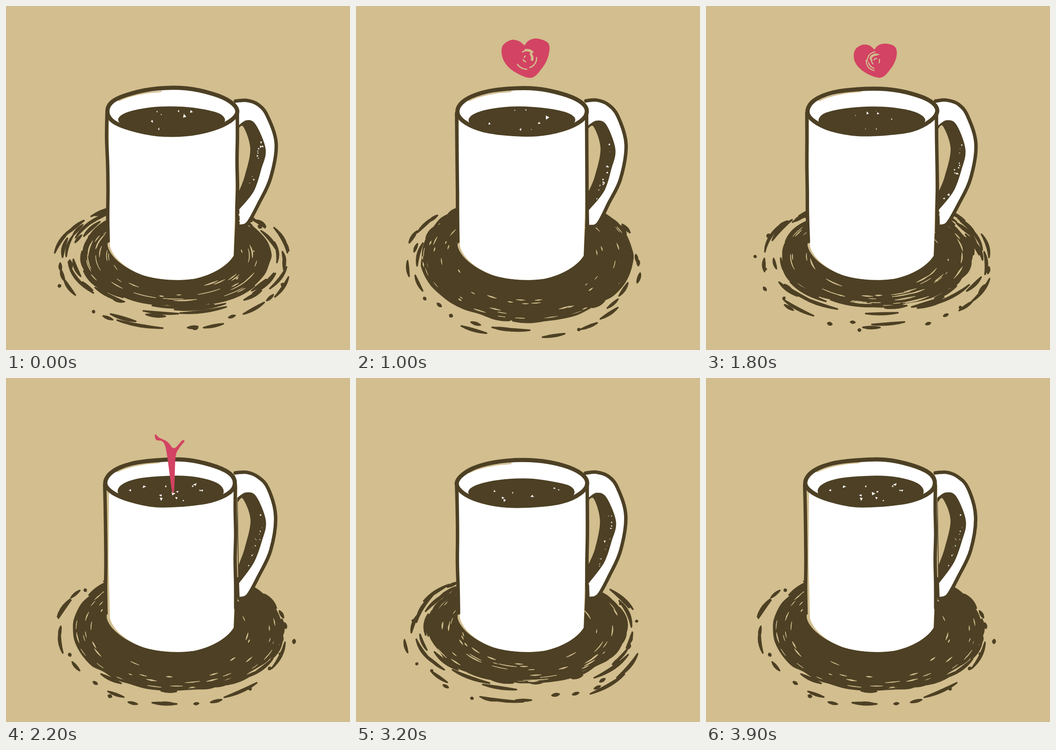
Write an HTML page that moves like this. It is 748 by 748 pixels and loops after 4 s.

```html
<!DOCTYPE html>
<html lang="en">
<head>
<meta charset="utf-8">
<title>Coffee cup</title>
<style>
html, body { margin: 0; width: 100%; height: 100%; overflow: hidden; background: #d2be8e; }
svg { display: block; width: 100vw; height: 100vh; }
path { stroke-linecap: round; stroke-linejoin: round; }
</style>
</head>
<body>
<svg id="stage" viewBox="0 0 748 748"></svg>
<script>
const TAN = '#d2be8e', INK = '#4d4024', PINK = '#d34363', WHITE = '#fff';
const STEP = 100, FRAMES = 40, POSES = 17, TAU = 2 * Math.PI;
const NS = 'http://www.w3.org/2000/svg';
const stage = document.getElementById('stage');

function layer(fill, stroke = 'none', width = 0, parent = stage) {
  const el = document.createElementNS(NS, 'path');
  el.setAttribute('fill', fill);
  el.setAttribute('stroke', stroke);
  el.setAttribute('stroke-width', width);
  parent.appendChild(el);
  return d => el.setAttribute('d', d);
}

const saucer = layer(INK, INK, 3.5);
const gaps = layer(TAN, TAN, 1);
const grip = layer(WHITE);
const gripShade = layer(INK, INK, 2);
const gripFlecks = layer(WHITE);
const hole = layer(TAN);
const shell = layer(TAN);
const body = layer(WHITE);
const mouth = layer(WHITE);
const lining = layer('none', TAN, 3);
const coffee = layer(INK, INK, 2);
const glints = layer(WHITE);
const thinLines = layer('none', INK, 7.5);
const thickLines = layer('none', INK, 9);
const love = document.createElementNS(NS, 'g');
stage.appendChild(love);
const heart = layer(PINK, PINK, 1.5, love);
const scribble = layer('none', TAN, 2.4, love);
const drops = layer(PINK, PINK, 3);

function seeded(seed) {
  let s = (seed * 2654435761 + 12345) >>> 0;
  return () => {
    s = (s + 0x6D2B79F5) >>> 0;
    let t = Math.imul(s ^ (s >>> 15), s | 1);
    t ^= t + Math.imul(t ^ (t >>> 7), t | 61);
    return ((t ^ (t >>> 14)) >>> 0) / 4294967296;
  };
}

const lerp = (a, b, k) => a + (b - a) * k;
const pair = (x, y) => x.toFixed(1) + ' ' + y.toFixed(1);

// "x y x y ..." to a list of points
function points(text) {
  const n = text.split(' ').map(Number), out = [];
  for (let i = 0; i < n.length; i += 2) out.push([n[i], n[i + 1]]);
  return out;
}

// Smooth curve through points
function curve(p, closed) {
  const n = p.length;
  const at = i => closed ? p[(i + n) % n] : p[Math.max(0, Math.min(n - 1, i))];
  let d = 'M' + pair(...p[0]);
  for (let i = 0; i < (closed ? n : n - 1); i++) {
    const [a, b, c, e] = [at(i - 1), at(i), at(i + 1), at(i + 2)];
    d += 'C' + pair(b[0] + (c[0] - a[0]) / 6, b[1] + (c[1] - a[1]) / 6) +
      ' ' + pair(c[0] - (e[0] - b[0]) / 6, c[1] - (e[1] - b[1]) / 6) + ' ' + pair(...c);
  }
  return d + (closed ? 'Z' : '');
}

const spot = (o, r, a) => [o.x + Math.cos(a) * o.rx * r, o.y + Math.sin(a) * o.ry * r];
const ring = (o, n, from = 0, to = TAU) =>
  Array.from({ length: n }, (_, i) => spot(o, 1, lerp(from, to, i / n)));
const shake = (list, amp, rnd) =>
  list.map(p => p.map(v => v + (rnd() - 0.5) * 2 * amp));

// Tapered brush dab along an oval
function dab(o, r, a, len, w) {
  const p = spot(o, r, a), q = spot(o, r, a + len);
  const [cx, cy] = spot(o, r / Math.cos(len / 2), a + len / 2);
  const size = Math.hypot(q[0] - p[0], q[1] - p[1]);
  const nx = (p[1] - q[1]) / size * w, ny = (q[0] - p[0]) / size * w;
  return 'M' + pair(...p) + 'Q' + pair(cx + nx, cy + ny) + ' ' + pair(...q) +
    'Q' + pair(cx - nx, cy - ny) + ' ' + pair(...p) + 'Z';
}

function speck(x, y, r, rnd) {
  const a = rnd() * TAU, size = () => r * (0.5 + rnd() * 0.8);
  const corner = i => pair(x + Math.cos(a + i * 2.1) * size(), y + Math.sin(a + i * 2.1) * size());
  return 'M' + corner(0) + 'L' + corner(1) + 'L' + corner(2) + 'Z';
}

// The saucer's scribble loosens and tightens once per cycle of poses
function drawSaucer(pose, rnd) {
  const loose = (0.5 + 0.5 * Math.cos((pose - 0.4) / POSES * TAU)) ** 2;
  const core = { x: 372, y: lerp(546, 543, loose), rx: lerp(230, 204, loose), ry: lerp(139, 108, loose) };
  const outer = { x: 365, y: 562, rx: 262, ry: lerp(160, 145, loose) };
  const front = () => -1.05 + rnd() * 5.2;

  let ink = curve(shake(ring(core, 40), 2.5, rnd), true), cut = '';
  for (let i = 0; i < 26 + 20 * loose; i++) {
    const r = 0.95 + rnd() * (0.06 + 0.22 * loose);
    ink += dab(core, r, front(), 0.1 + rnd() * (0.2 + 0.3 * loose), 3 + rnd() * 2.5);
  }
  for (let i = 0; i < 28; i++) {
    const a = -1.05 + (i + rnd()) / 28 * 5.2;
    ink += dab(outer, 0.88 + rnd() * 0.13, a, 0.02 + rnd() ** 2 * 0.4, 3.6 + rnd() * 1.6);
  }
  for (let i = 0; i < 46; i++) {
    cut += dab(core, 0.66 + rnd() * 0.33, front(), 0.04 + rnd() * (0.1 + 0.22 * loose), 0.6 + rnd() * 2);
  }
  saucer(ink);
  gaps(cut);
}

const gripOuter = points('499 206 523 205 548 214 569 239 587 300 575 375 550 430 526 473 508 479');
const gripInner = points('504 262 522 250 543 259 564 312 555 355 538 402 505 445');
const gripHole = points('503 270 516 262 531 310 520 370 506 405');

function bodyShape(left, right) {
  return `M${left} 235L${left - 1} 400L${left + 2} 522C${left + 9} 550 265 574 300 586` +
    `C340 598 385 597 410 593C450 584 480 566 495 543L${right - 1} 400L${right} 235Z`;
}

function drawMug(pose, rnd) {
  const tilt = pose >= 3 && pose <= 8 ? 1 : 0;
  const rim = { x: 361 - 4 * tilt, y: 229 - 2 * tilt, rx: 141, ry: 50 };
  const brew = { x: 360 - 2 * tilt, y: 248 - 2 * tilt, rx: 115, ry: 28 + 5 * tilt };

  const outer = shake(gripOuter, 1, rnd);
  grip(curve(outer) + 'Z');
  gripShade(curve(shake(gripInner, 1, rnd)) + 'Z');
  hole(curve(shake(gripHole, 1, rnd)) + 'Z');
  let d = '';
  for (let i = 0; i < 13; i++) {
    const k = rnd();
    d += speck(lerp(553, 517, k * k) + rnd() * 11 - 5, lerp(295, 422, k), 1 + rnd() * 2.6, rnd);
  }
  gripFlecks(d);

  shell(bodyShape(219 - 2 * tilt, 503));
  body(bodyShape(224, 500));
  const lip = curve(shake(ring(rim, 14), 1.2, rnd), true);
  mouth(lip);
  lining(curve(ring({ ...rim, rx: 136, ry: 44 }, 6, 3.7, 4.7)));
  coffee(curve(shake(ring(brew, 14), 1, rnd), true));
  d = '';
  for (let i = 0; i < 7 + 6 * tilt; i++) {
    d += speck(...spot(brew, Math.sqrt(rnd()) * 0.78, rnd() * TAU), 1.5 + rnd() * 3.4, rnd);
  }
  glints(d);

  const side = (x, lean, end) => {
    const list = [];
    for (let i = 0; i <= 5; i++) list.push([x + lean * i / 5 - 4 * tilt, lerp(233, end, i / 5)]);
    return curve(shake(list, 1, rnd));
  };
  thinLines(curve(outer) + side(219, 3, 512) + side(502, 1, 500));
  thickLines(lip);
}

const fullHeart = points('366 96 354 86 338 85 323 97 324 122 344 143 379 156 400 137 412 113 412 91 393 82 375 86');
const spilt = points('361 152 350 139 332 130 325 123 327 134 347 148 363 250 368 172 377 151 387 138 383 137 369 152');
const pinkSpots = points('300 244 338 242 393 243 340 266');
const BORN = 6, GROWN = 12, FALL = 18, POURED = 22, GONE = 30;

function backOut(k) {
  const over = 2.1, j = k - 1;
  return 1 + (over + 1) * j ** 3 + over * j * j;
}

function drawLove(frame, rnd) {
  const grow = Math.min(1, (frame - BORN) / (GROWN - BORN));
  const melt = Math.max(0, Math.min(1, (frame - FALL) / (POURED - FALL))) ** 1.5;
  const falling = frame > FALL;
  let shape = '', swirl = '', wet = '';

  if (frame >= BORN && frame < POURED + 3) {
    const list = fullHeart.map((p, i) => p.map((v, j) => lerp(v, spilt[i][j], melt)));
    const drawn = shake(list, 1 - melt, rnd);
    shape = curve([...drawn, drawn[0]]) + 'Z';
    const s = falling ? 1 - 0.42 * Math.max(0, frame - POURED) : 0.08 + 0.92 * backOut(grow);
    const [x, y] = falling ? [363, 248] : [368, 119];
    love.setAttribute('transform',
      `translate(${lerp(371, x, grow)} ${lerp(102, y, grow)}) scale(${s}) translate(${-x} ${-y})`);
  }
  if (frame > BORN && !falling) {
    for (let i = 0; i < 8; i++) {
      const r = 5 + i * 2.4, o = { x: 370, y: 119, rx: r, ry: r };
      const a = rnd() * TAU;
      swirl += curve(ring(o, 6, a, a + 0.8 + rnd() * 1.2));
    }
  }
  if (frame > POURED + 1 && frame < GONE) {
    const k = Math.min(1, (frame - POURED) / 6), size = Math.min(1, (GONE - frame) / 2);
    pinkSpots.forEach(([x, y], i) => {
      const o = { x: lerp(363, x, k), y: lerp(248, y, k), rx: (i > 2 ? 8 : 1.5) * size, ry: (i > 2 ? 1.5 : 3) * size };
      wet += curve(shake(ring(o, 6), 0.5, rnd), true);
    });
  }
  heart(shape);
  scribble(swirl);
  drops(wet);
}

const start = performance.now();
let shown = -1;
function tick() {
  const frame = Math.floor((performance.now() - start) / STEP) % FRAMES;
  if (frame !== shown) {
    shown = frame;
    const pose = frame % POSES;
    drawSaucer(pose, seeded(pose + 11));
    drawMug(pose, seeded(pose + 51));
    drawLove(frame, seeded(frame + 91));
  }
  requestAnimationFrame(tick);
}
tick();
</script>
</body>
</html>
```
